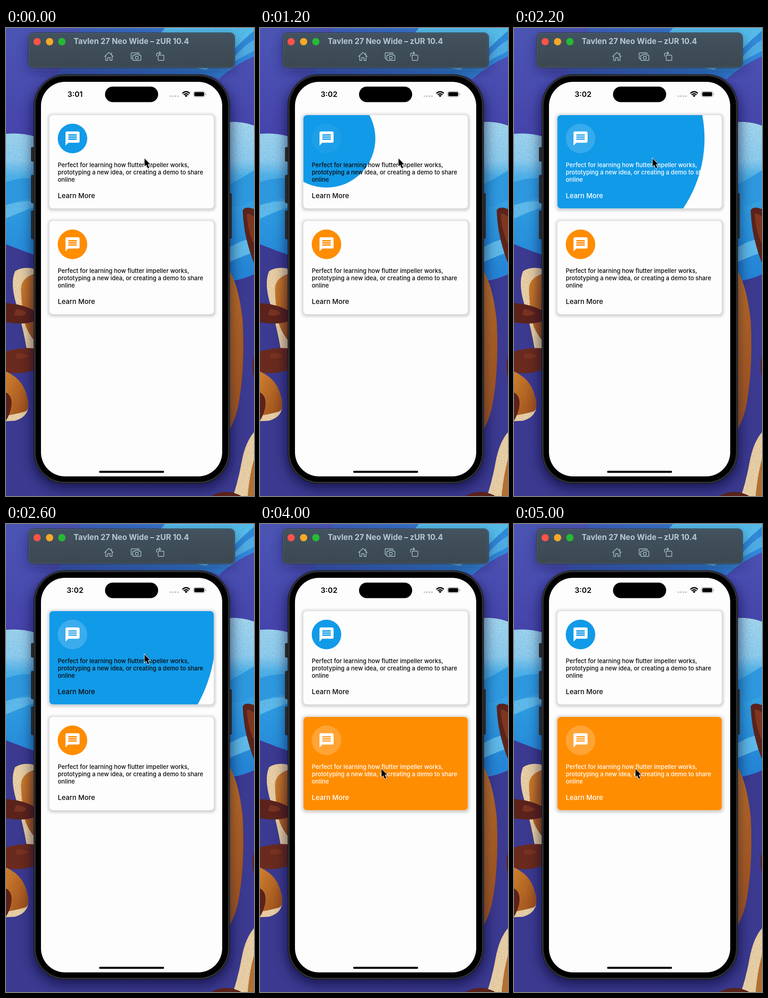
Animation of 546x1026 px, one loop 5.2 s. Source, as an HTML page:

```html
<!DOCTYPE html>
<html lang="en">
<head>
<meta charset="utf-8">
<title>Card reveal</title>
<style>
html, body { margin: 0; width: 100%; height: 100%; overflow: hidden; background: #3c3a92; }
svg { display: block; width: 546px; height: 1026px; font-family: Inter, Roboto, sans-serif; }
.body { font-size: 13px; font-weight: 500; }
.link { font-size: 15px; font-weight: 500; }
.tool { fill: none; stroke: #a9c4d3; stroke-width: 1.4; stroke-linejoin: round; stroke-linecap: round; }
</style>
</head>
<body>
<svg viewBox="0 0 546 1026">
  <defs>
    <linearGradient id="sky" x1="0" y1="0" x2="0" y2="1">
      <stop offset="0" stop-color="#a6dcf3"/><stop offset=".24" stop-color="#8fd2f2"/>
      <stop offset=".34" stop-color="#4fb6ec"/><stop offset=".58" stop-color="#2b9fe6"/>
      <stop offset="1" stop-color="#2286da"/>
    </linearGradient>
    <linearGradient id="dusk" x1="0" y1="0" x2="0" y2="1">
      <stop offset="0" stop-color="#4d57b8"/><stop offset="1" stop-color="#4644ae"/>
    </linearGradient>
    <linearGradient id="top" x1="0" y1="0" x2="1" y2="0">
      <stop offset="0" stop-color="#3f5cba"/><stop offset="1" stop-color="#2f8fdf"/>
    </linearGradient>
    <linearGradient id="fur" x1="0" y1="0" x2="1" y2="1">
      <stop offset="0" stop-color="#d98528"/><stop offset="1" stop-color="#9c4a16"/>
    </linearGradient>
    <linearGradient id="bar" x1="0" y1="0" x2="0" y2="1">
      <stop offset="0" stop-color="#43525f"/><stop offset="1" stop-color="#3b4850"/>
    </linearGradient>
    <filter id="grain" x="0" y="0" width="1" height="1">
      <feTurbulence type="fractalNoise" baseFrequency=".6" numOctaves="2" seed="4"/>
      <feColorMatrix values="0 0 0 0 .05  0 0 0 0 .05  0 0 0 0 .2  0 0 0 2 -.85"/>
    </filter>
    <filter id="blur" x="-20%" y="-20%" width="140%" height="140%"><feGaussianBlur stdDeviation="14"/></filter>
    <filter id="soft" x="-10%" y="-15%" width="120%" height="130%"><feGaussianBlur stdDeviation="2.5"/></filter>
    <clipPath id="card"><rect x="95.5" y="191" width="362" height="204.5" rx="8"/></clipPath>
  </defs>

  <!-- wallpaper -->
  <path fill="#3c3a92" d="M0 0H546V1026H0z"/>
  <path fill="url(#dusk)" d="M0 0H546V240H0z"/>
  <path fill="url(#top)" d="M110 105Q160 40 160 0H546V62Q500 82 468 112L450 105z"/>
  <path fill="#56c3ef" d="M350 0H546V6Q520 28 503 46L440 92 300 60z"/>
  <path fill="#4fb3ea" d="M546 26Q515 44 490 80L546 50z"/>
  <path fill="url(#sky)" d="M0 232Q35 229 64 238V498Q30 486 0 474zM490 206Q520 204 546 214V540Q520 552 490 556z"/>
  <path fill="#2d9ee5" d="M0 338Q34 326 64 330V372Q30 376 0 388zM490 344Q525 326 546 312V378Q520 390 490 396z"/>
  <path fill="#5fc0f0" d="M0 388Q35 378 64 380V392Q30 404 0 418zM490 482Q515 466 546 460V492Q520 500 490 514z"/>
  <path fill="#f0d5a5" d="M20 533Q40 521 66 529V706H46Q38 660 24 610 8 560 20 533z"/>
  <path fill="url(#fur)" d="M33 570Q35 546 66 538V690Q50 672 42 650 33 605 33 570z"/>
  <path fill="#5d2115" d="M0 603Q42 606 66 622V642Q38 652 0 645z"/>
  <path fill="#6d2917" d="M0 709Q40 698 66 703V748Q30 762 0 754z"/>
  <path fill="#7d321c" d="M22 616q18 2 24 10-14 8-28 3zM24 714q16-3 26 5-14 8-28 4z"/>
  <path fill="#f0d5a5" d="M0 764Q46 796 49 824 51 852 20 861L0 862z"/>
  <path fill="url(#fur)" d="M0 753Q34 768 44 800 55 832 44 840 25 846 0 850z"/>
  <path fill="#5d2115" d="M0 799Q14 806 12 828 10 844 0 861z"/>
  <path fill="#5d2115" d="M546 397Q526 389 521 400 523 445 534 480 541 505 546 515z"/>
  <path fill="#833619" d="M546 414Q535 404 530 408 532 445 546 474z"/>
  <path fill="url(#fur)" d="M488 526Q512 560 521 640 527 750 510 835 502 865 488 888z"/>
  <path fill="#5d2115" d="M546 720q-6 15 0 50z"/>
  <path fill="#f0d5a5" d="M546 886Q527 908 519 950 512 990 500 1026H546z"/>
  <path fill="#b8732f" d="M546 945Q536 980 532 1026H546z"/>
  <path fill="#5d2115" d="M452 1026Q485 1008 518 1026z"/>
  <path filter="url(#grain)" opacity=".35" d="M0 0H546V1026H0z"/>

  <!-- simulator bar -->
  <rect x="50" y="18" width="453" height="76" rx="10" fill="#0a0a30" opacity=".4" filter="url(#blur)"/>
  <rect x="49.5" y="10.5" width="454" height="76.5" rx="10" fill="url(#bar)" stroke="#26303a"/>
  <rect x="50.5" y="11.5" width="452" height="74.5" rx="9" fill="none" stroke="#66747e" stroke-opacity=".7"/>
  <circle cx="68.5" cy="30" r="8" fill="#fb534b"/>
  <circle cx="96" cy="30" r="8" fill="#f6a928"/>
  <circle cx="123" cy="30" r="8" fill="#25bb36"/>
  <text x="149" y="35" font-size="17" font-weight="700" fill="#b7c8d4">Tavlen 27 Neo Wide – zUR 10.4</text>
  <g class="tool">
    <path d="M217 62.5L226.500 53.500 236 62.500M219.500 61V71H224V65H229V71H233.500V61M232.500 58V54.500"/>
    <path d="M278 67.500H277.500Q275.500 67.500 275.500 65.500V56.500Q275.500 54.500 277.500 54.500H291.500Q293.500 54.500 293.500 56.500"/>
    <path d="M281 59.500H284L285.500 57.500H291L292.500 59.500H295Q297 59.500 297 61.500V69Q297 71 295 71H281Q279 71 279 69V61.500Q279 59.500 281 59.500z"/>
    <circle cx="288" cy="65" r="3.300"/>
    <rect x="335" y="59.500" width="12.500" height="11.500" rx="1.500"/>
    <path d="M331.500 62V58Q331.500 55 334.500 55H340M337.500 52L340.500 55 337.500 58"/>
  </g>

  <!-- phone -->
  <rect x="58" y="112" width="438" height="898" rx="70" fill="#06062a" opacity=".6" filter="url(#blur)"/>
  <path fill="#25272b" d="M55 264q0-3 3-3h5v32h-5q-3 0-3-3zM55 325q0-3 3-3h5v62h-5q-3 0-3-3zM55 403q0-3 3-3h5v63h-5q-3 0-3-3zM490 362h4q3 0 3 3v94q0 3-3 3h-4z"/>
  <rect x="61.500" y="102" width="431" height="896.500" rx="68" fill="#232426" stroke="#111"/>
  <rect x="63" y="103.500" width="428" height="893.500" rx="66.500" fill="none" stroke="#45474a"/>
  <rect x="65.500" y="106" width="423" height="888.500" rx="64"/>
  <rect x="77" y="118" width="399" height="865" rx="53" fill="#fefdfe"/>
  <rect x="218" y="128.500" width="117" height="34" rx="17"/>
  <rect x="205" y="970.800" width="143" height="4.500" rx="2.250"/>
  <text id="clock" x="152" y="151" font-size="16.500" font-weight="600" text-anchor="middle">3:01</text>
  <path stroke="#c4c4c7" stroke-width="3.800" stroke-linecap="round" stroke-dasharray="0 5.500" d="M362 149.500H379"/>
  <path fill="none" stroke="#000" stroke-width="2.500" d="M388.300 143.400Q396.500 135.900 404.700 143.400M391.200 146.500Q396.500 141.700 401.800 146.500"/>
  <path d="M393.300 148.200Q396.500 145.500 399.700 148.200L396.500 151.500z"/>
  <rect x="412.800" y="139" width="25" height="12" rx="3.800" fill="none" stroke="#999"/>
  <rect x="414.500" y="140.600" width="21.600" height="8.800" rx="2.500"/>
  <path fill="#999" d="M439.300 143v4q1.700-.5 1.700-2t-1.700-2z"/>

  <g id="cards"></g>

  <g id="cursor">
    <path d="M1 2V20L5.500 16 9 24.500 12.500 23 9 14.500H15z" opacity=".25" filter="url(#soft)"/>
    <path d="M.5 1V18.500L4.300 14.900 7.700 22.500 10.700 21.200 7.500 13.800H12.800z" stroke="#fff" stroke-width="1.800" paint-order="stroke"/>
  </g>
</svg>
<script>
const LOOP = 5200, STEP = 200, FADE = 330;
const $ = id => document.getElementById(id);
const clamp = x => Math.max(0, Math.min(1, x));

const lines = [
  'Perfect for learning how flutter impeller works,',
  'prototyping a new idea, or creating a demo to share',
  'online'
].map((s, i) => `<text class="body" x="114" y="${305.3 + 16 * i}">${s}</text>`).join('');

// taps: [opened at, closed at]
const cards = [
  { y: 0, color: '#119ae8', taps: [[300, 948], [1950, 2564]] },
  { y: 232, color: '#ff8d02', taps: [[3350, LOOP + FADE]] }
];

$('cards').innerHTML = cards.map(c => `<g transform="translate(0 ${c.y})">
  <rect x="91" y="187.500" width="371" height="214" rx="10" fill="#d2d1d4" opacity=".7" filter="url(#soft)"/>
  <rect x="96" y="193" width="364" height="206" rx="9" fill="#c4c4c4" opacity=".4" filter="url(#soft)"/>
  <rect x="95.500" y="191" width="362" height="204.500" rx="8" fill="#fefdfe"/>
  <g clip-path="url(#card)"><circle class="ink" cx="146.400" cy="242.300" fill="${c.color}"/></g>
  <circle class="halo" cx="146.400" cy="242.300" r="32.500" fill="#fff"/>
  <path transform="translate(127.900 223.600) scale(1.55)" fill="#fff" fill-rule="evenodd" d="M20 2H4C2.900 2 2 2.900 2 4V22L6 18H20C21.100 18 22 17.100 22 16V4C22 2.900 21.100 2 20 2zM18 14H6V12H18zM18 11H6V9H18zM18 8H6V6H18z"/>
  <g class="copy">${lines}<text class="link" x="114" y="373.300">Learn More</text></g>
</g>`).join('');

cards.forEach((c, i) => {
  const g = $('cards').children[i];
  for (const part of ['ink', 'halo', 'copy']) c[part] = g.querySelector('.' + part);
});

function draw(t) {
  for (const c of cards) {
    const open = c.taps.reduce((p, [on, off]) =>
      p + clamp((t - on) / FADE) - clamp((t - off) / FADE), 0);
    const active = c.taps.some(([on, off]) => t >= on && t < off);
    c.ink.setAttribute('r', 32.5 + 317.5 * open);
    c.halo.setAttribute('opacity', .2 * open);
    c.copy.setAttribute('fill', active ? '#fff' : '#0a0a0a');
  }
  const m = clamp((t - 2700) / 450), e = m * m * (3 - 2 * m);
  $('cursor').setAttribute('transform', `translate(${304.5 - 37.5 * e} ${285 + 251 * e})`);
  $('clock').textContent = t < 600 ? '3:01' : '3:02';
}

const start = performance.now();
function tick() {
  const t = (performance.now() - start) % LOOP;
  draw(Math.floor(t / STEP) * STEP);
  requestAnimationFrame(tick);
}
tick();
</script>
</body>
</html>
```
